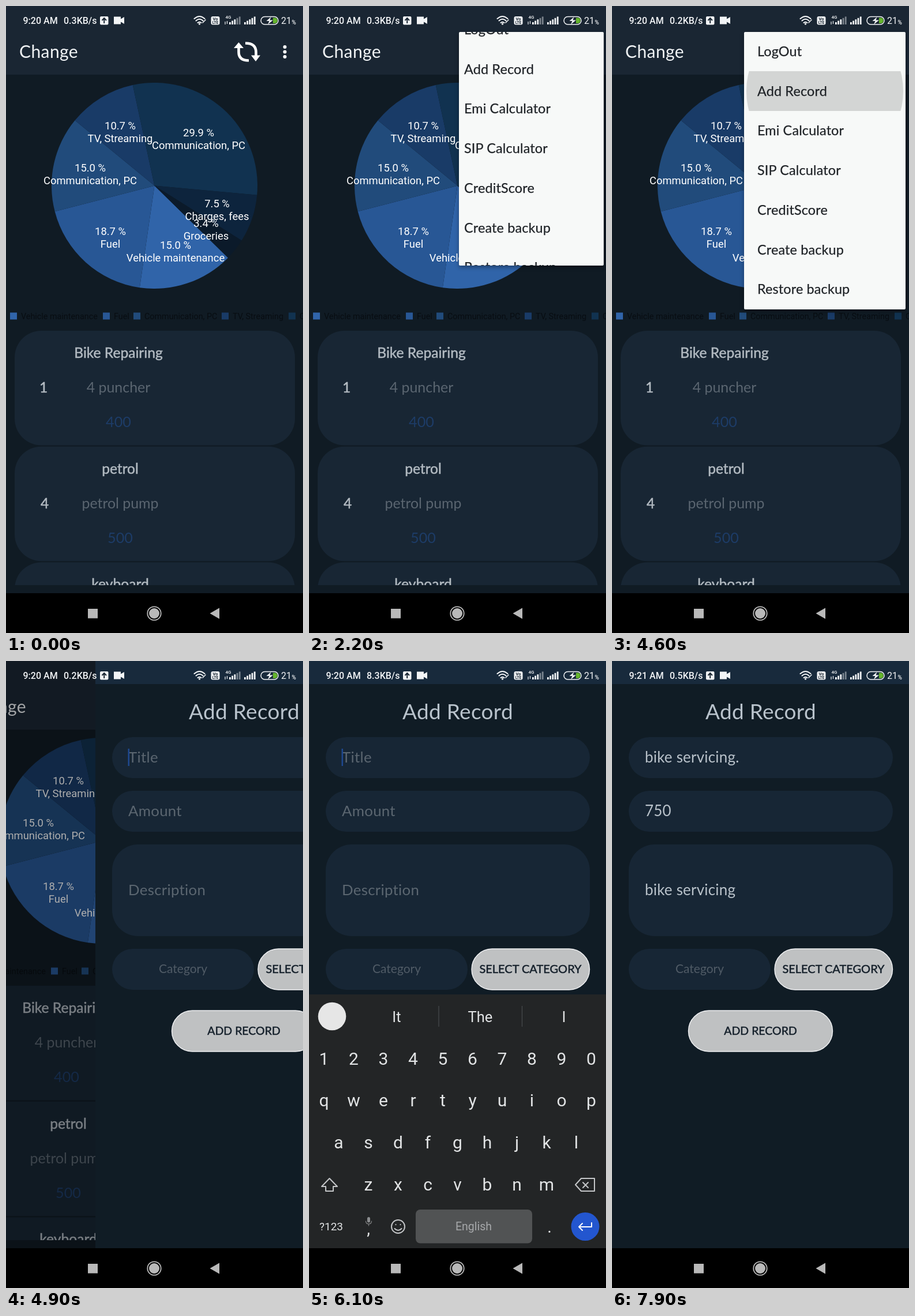
These frames come from a looping animation (515x1087 px, 8000 ms). An HTML page:

```html
<!DOCTYPE html>
<html lang="en">
<head>
<meta charset="utf-8">
<title>Expense tracker</title>
<style>
html, body { margin: 0; width: 100%; height: 100%; overflow: hidden; background: #000; }
body { position: relative; }
svg { display: block; position: absolute; left: 0; top: 0; }
text {
  font-family: Lato, "Open Sans", sans-serif; font-size: 25px; fill: currentColor;
  white-space: pre; font-variant-ligatures: none;
}
.mid { text-anchor: middle; }
.bold { stroke: currentColor; stroke-width: .5px; }
.robo, .robo text { font-family: Roboto, "Noto Sans", sans-serif; }
.hint { color: #5b6670; font-size: 25.8px; letter-spacing: .3px; }
.typed { color: #b9c2ca; font-size: 26px; letter-spacing: .2px; }
.line { fill: none; stroke: currentColor; stroke-width: 2; stroke-linecap: round; stroke-linejoin: round; }
#items text { letter-spacing: .15px; stroke: currentColor; stroke-width: .25px; }

/* One shared 8 s clock; every track holds its value between keys. */
.main, .dim, .page, .blank, .caret, .keys, .touch, .menu, .press, .early, .late, .s1, .s2, .s3 {
  animation: 8s step-end -.03s infinite;
}
.main { animation-name: main; }
.dim { animation-name: dim; }
.page { animation-name: page; }
.blank { animation-name: blank; }
.caret { animation-name: caret; }
.keys { animation-name: keys; }
.touch { animation-name: touch; }
.early { animation-name: early; }
.late { animation-name: late; }
.s1 { animation-name: s1; }
.s2 { animation-name: s2; }
.s3 { animation-name: s3; }
.press { animation-name: press; transform-origin: 369px 147.5px; }
.menu {
  animation-name: menu; position: absolute; top: 45px; overflow: hidden;
  background: #f7f9f8; border-radius: 2px; box-shadow: 0 3px 7px rgba(0, 0, 0, .35);
}
.menu svg { left: 50%; top: 50%; margin: -240.5px 0 0 -140px; }

@keyframes main {
  0% { transform: none; }
  60% { transform: translateX(-34px); }
  61.25% { transform: translateX(-90px); }
  62.5% { transform: translateX(-117px); }
  63.75% { transform: translateX(-127px); }
  65%, 100% { transform: translateX(-129px); }
}
@keyframes dim {
  0% { opacity: 0; }
  60% { opacity: .12; }
  61.25% { opacity: .32; }
  62.5% { opacity: .4; }
  63.75%, 100% { opacity: .45; }
}
@keyframes page {
  0% { transform: translateX(515px); }
  60% { transform: translateX(380px); }
  61.25% { transform: translateX(155px); }
  62.5% { transform: translateX(48px); }
  63.75% { transform: translateX(8px); }
  65%, 100% { transform: none; }
}
@keyframes blank { 0% { opacity: 0; } 62.5% { opacity: 1; } 80%, 100% { opacity: 0; } }
@keyframes caret {
  0%, 66.25%, 78.75%, 91.25%, 100% { opacity: 0; }
  60%, 72.5%, 85% { opacity: 1; }
}
@keyframes keys {
  0% { transform: translateY(509px); }
  62.5% { transform: translateY(150px); }
  63.75% { transform: translateY(10px); }
  65% { transform: none; }
  80% { transform: translateY(170px); }
  81.25% { transform: translateY(448px); }
  82.5%, 100% { transform: translateY(509px); }
}
@keyframes touch { 0% { opacity: 0; } 80% { opacity: .07; } 81.25% { opacity: .05; } 82.5%, 100% { opacity: 0; } }
@keyframes menu {
  0% { left: 350px; width: 160px; height: 250px; opacity: 0; }
  26.25% { left: 350px; width: 160px; height: 250px; opacity: .6; }
  27.5% { left: 260px; width: 251px; height: 405px; opacity: 1; }
  28.75% { left: 232px; width: 277px; height: 476px; opacity: 1; }
  30% { left: 229px; width: 280px; height: 481px; opacity: 1; }
  58.75% { left: 229px; width: 280px; height: 481px; opacity: .6; }
  60%, 100% { left: 229px; width: 280px; height: 481px; opacity: 0; }
}
@keyframes press {
  0% { transform: scale(0); }
  56.25% { transform: scale(.65); }
  57.5% { transform: none; }
  58.75%, 100% { transform: scale(1.2); }
}
@keyframes early { 0% { opacity: 1; } 91.25%, 100% { opacity: 0; } }
@keyframes late { 0% { opacity: 0; } 91.25%, 100% { opacity: 1; } }
@keyframes s1 { 0% { opacity: 1; } 33.75%, 100% { opacity: 0; } }
@keyframes s2 { 0% { opacity: 0; } 33.75% { opacity: 1; } 71.25%, 100% { opacity: 0; } }
@keyframes s3 { 0% { opacity: 0; } 71.25% { opacity: 1; } 91.25%, 100% { opacity: 0; } }
</style>
</head>
<body>
<svg width="515" height="1087" viewBox="0 0 515 1087">
  <defs>
    <clipPath id="list"><rect y="550" width="515" height="454"/></clipPath>
    <clipPath id="row"><rect x="229" y="113.5" width="280" height="68.5"/></clipPath>
  </defs>

  <g class="main">
    <rect width="660" height="1018" fill="#101b24"/>
    <rect width="660" height="119" fill="#1a2633"/>
    <text x="23" y="89.5" style="font-size:30px;letter-spacing:.4px;color:#f0f3f5">Change</text>
    <g fill="#fff">
      <path d="M403.5 71V80Q403.5 94.5 421 94.5M415 64.500Q433.500 64.500 433.500 80V87" fill="none" stroke="#fff" stroke-width="4.6"/>
      <path d="M395 73L403.500 63L412 73ZM425 85.500H441L433 96Z"/>
      <circle cx="483.500" cy="71" r="3"/><circle cx="483.500" cy="79.500" r="3"/><circle cx="483.500" cy="88" r="3"/>
    </g>
    <g id="pie" class="robo" color="#fff"></g>
    <g id="legend" class="robo" color="#080d12"></g>
    <g id="cards" clip-path="url(#list)"></g>
  </g>
  <rect class="dim" width="515" height="1018" fill="#000"/>

  <g class="page">
    <rect width="515" height="1018" fill="#101c25"/>
    <rect width="515" height="40" fill="#182a3c"/>
    <text class="mid" x="258" y="101" style="font-size:37px;letter-spacing:.3px;color:#b9c3cc">Add Record</text>
    <g fill="#172635">
      <rect x="29" y="132" width="458" height="71" rx="35.500"/>
      <rect x="29" y="225" width="458" height="71" rx="35.500"/>
      <rect x="29" y="318" width="458" height="159" rx="45"/>
      <rect x="29" y="499" width="246" height="71" rx="35.500"/>
    </g>
    <g class="early">
      <text class="hint" x="57" y="175.500">Title</text>
      <text class="hint" x="57" y="268.500">Amount</text>
      <text class="hint" x="57" y="405.500">Description</text>
    </g>
    <g class="late">
      <text class="typed" x="57" y="175.500">bike servicing.</text>
      <text class="typed" x="57" y="268.500">750</text>
      <text class="typed" x="57" y="405.500">bike servicing</text>
    </g>
    <rect class="caret" x="56.500" y="152" width="2.500" height="30" fill="#1e4890"/>
    <text class="mid" x="152" y="541" style="font-size:21px;color:#505b66">Category</text>
    <g fill="#bfc1c2" stroke="#f1f2f4" stroke-width="1.400">
      <rect x="282" y="499" width="204.500" height="71" rx="35.500"/>
      <rect x="132.500" y="606" width="250" height="71" rx="35.500"/>
    </g>
    <g color="#15202b">
      <text class="mid bold" x="384" y="541" style="font-size:20px">SELECT CATEGORY</text>
      <text class="mid bold" x="257.500" y="648" style="font-size:19.500px">ADD RECORD</text>
    </g>
    <rect class="blank" y="578" width="515" height="440" fill="#fff"/>
  </g>

  <rect y="1018" width="515" height="69" fill="#000"/>

  <g class="keys robo" color="#e2e4e5">
    <rect y="578" width="515" height="440" fill="#232526"/>
    <circle cx="40" cy="616" r="24.300" fill="#e6e6e6"/>
    <path d="M225 598V634M369.500 598V634" stroke="#484b4d" stroke-width="1.200"/>
    <g id="letters"></g>
    <rect x="185" y="951" width="202" height="58.500" rx="8" fill="#515354"/>
    <text class="mid" x="285.500" y="986.500" style="font-size:19.500px;color:#a6a8aa">English</text>
    <text class="mid" x="38.500" y="987" style="font-size:19px">?123</text>
    <text class="mid" x="103" y="994" style="font-size:29px">,</text>
    <text class="mid" x="417" y="991" style="font-size:29px">.</text>
    <g class="line" color="#c4c6c8">
      <path d="M35.500 897L49 911H42V919H29V911H22Z"/>
      <path d="M472 897H495V919H472L462 908ZM475 904L484 913M484 904L475 913"/>
      <circle cx="154.500" cy="980.500" r="11.500"/>
      <path d="M148.500 984Q154.500 990 160.500 984M150.500 977V977.200M158.500 977V977.200"/>
      <path d="M98.500 971Q98.500 976 103.500 976T108.500 971M103.500 976V979" stroke-width="1.200" opacity=".6"/>
    </g>
    <rect x="101" y="964" width="5" height="9.500" rx="2.500" fill="#8b8d8f"/>
    <circle cx="479" cy="980.500" r="24.500" fill="#2356cf"/>
    <path class="line" d="M490 974V981H468M474 975L468 981L474 987" color="#fff" stroke-width="2.400"/>
  </g>

  <ellipse class="touch" cx="366" cy="1053" rx="54" ry="34" fill="#fff"/>
  <g fill="#b9b9b9">
    <rect x="142" y="1045" width="17" height="16.500"/>
    <circle cx="257" cy="1053" r="9"/>
    <circle cx="257" cy="1053" r="11.700" fill="none" stroke="#b9b9b9" stroke-width="1.800"/>
    <path d="M353.500 1053L370 1043.500V1062.500Z"/>
  </g>

  <g id="status" class="robo" color="#f2f4f6" fill="#f2f4f6">
    <rect x="163" y="18" width="14.500" height="14.500" rx="2"/>
    <path d="M170.200 30V21.500M166.500 25L170.200 21L174 25" fill="none" stroke="#1a2633" stroke-width="2"/>
    <path d="M187 18.500H199V22.500L205 19V31L199 27.500V31.500H187Z"/>
    <g class="line" stroke-width="2.200">
      <path d="M326.500 22Q335.500 14 344.500 22M329.500 25.500Q335.500 20 341.500 25.500M332.500 29Q335.500 26.500 338.500 29"/>
      <path d="M341 29L346 24" stroke-width="1.500"/>
    </g>
    <circle cx="335.500" cy="31" r="1.700"/>
    <rect x="355.500" y="18" width="15" height="14.500" rx="3"/>
    <g style="color:#1a2633">
      <text class="mid" x="363" y="25" style="font-size:7.500px;font-weight:700">Vo</text>
      <text class="mid" x="363" y="31" style="font-size:6.500px;font-weight:700">LTE</text>
    </g>
    <text x="380.500" y="22" style="font-size:8px;font-weight:500">4G</text>
    <path d="M380 27V32M383.500 26V31" stroke="#f2f4f6" stroke-width="1.200"/>
    <g id="bars"></g>
    <rect x="442" y="18.500" width="30" height="13.500" rx="6.700" fill="none" stroke="#f2f4f6" stroke-width="1.500"/>
    <path d="M463 20.500H466Q470.500 20.500 470.500 25.200T466 30H463Z" fill="#65b52c"/>
    <path d="M459.500 19L451.500 26H456.500L454 32L463 24.500H457.500Z"/>
    <text x="477" y="31" style="font-size:16px">21</text>
    <text x="495.500" y="31.500" style="font-size:10px;font-weight:500">%</text>
  </g>
</svg>

<div class="menu">
  <svg width="280" height="481" viewBox="229 45 280 481">
    <g clip-path="url(#row)"><circle class="press" cx="369" cy="147.500" r="136" fill="#d3d5d4"/></g>
    <g id="items" color="#1f2327"></g>
  </svg>
</div>

<script>
const NS = "http://www.w3.org/2000/svg";
const $ = id => document.getElementById(id);

function add(parent, tag, attrs, content) {
  const el = document.createElementNS(NS, tag);
  for (const key in attrs) el.setAttribute(key, attrs[key]);
  if (content) el.textContent = content;
  parent.appendChild(el);
  return el;
}
const label = (parent, content, x, y, size, cls = "", color = "inherit") =>
  add(parent, "text", { x, y, class: cls, style: `font-size:${size}px;color:${color}` }, content);

// name, share, label centre, colour
const slices = [
  ["Vehicle maintenance", 15.0, 294, 414, "#3064a9"],
  ["Fuel", 18.7, 181, 390, "#285795"],
  ["Communication, PC", 15.0, 146, 280, "#214b7b"],
  ["TV, Streaming", 10.7, 198, 207, "#193b67"],
  ["Communication, PC", 29.9, 334, 219.5, "#113250"],
  ["Charges, fees", 7.5, 366, 342, "#0d243d"],
  ["Groceries", 3.4, 347, 376, "#0b1a2a"]
];

function drawPie() {
  const cx = 257.5, cy = 311.5, r = 178.5;
  const total = slices.reduce((sum, s) => sum + s[1], 0);
  const rim = a => `${cx + r * Math.cos(a)} ${cy + r * Math.sin(a)}`;
  let angle = 44.4 * Math.PI / 180;
  for (const [, share, , , fill] of slices) {
    const end = angle + share / total * 2 * Math.PI;
    add($("pie"), "path", { d: `M${cx} ${cy}L${rim(angle)}A${r} ${r} 0 0 1 ${rim(end)}Z`, fill });
    angle = end;
  }
  for (const [name, share, x, y] of slices) {
    label($("pie"), share.toFixed(1) + " %", x, y + 6.5, 18.4, "mid");
    label($("pie"), name, x, y + 28.5, 18.4, "mid");
  }
}

function drawLegend() {
  [7, 168, 221, 374, 490].forEach((x, i) => {
    add($("legend"), "rect", { x, y: 531.5, width: 12, height: 12, fill: slices[i][4] });
    label($("legend"), slices[i][0], x + 19, 542.5, 14.35);
  });
}

function drawCards() {
  const rows = [
    ["1", 65, "Bike Repairing", "4 puncher", "400", 195],
    ["4", 67, "petrol", "petrol pump", "500", 198],
    ["5", 67, "keyboard", "new", "600", 198]
  ];
  rows.forEach(([count, cx, title, note, sum, x], i) => {
    const y = 563 + i * 200.7, g = $("cards");
    add(g, "rect", { x: 15, y, width: 486, height: 198.5, rx: 46, fill: "#182634" });
    label(g, count, cx, y + 107, 24.5, "mid bold", "#b2bac1");
    label(g, title, x, y + 47, 24.6, "mid bold", "#b2bac1");
    label(g, note, x, y + 107, 24.9, "mid", "#5a6570");
    label(g, sum, x, y + 167, 25.2, "mid", "#1d3c67");
  });
}

function drawKeys() {
  const rows = [["1234567890", 26, 700], ["qwertyuiop", 26, 772], ["asdfghjkl", 51.5, 845], ["zxcvbnm", 103, 918]];
  for (const [chars, x, y] of rows)
    [...chars].forEach((c, i) => label($("letters"), c, x + i * 51.5, y, 30, "mid"));
  ["It", "The", "I"].forEach((word, i) => label($("letters"), word, 152 + i * 145, 626, 25.5, "mid"));
}

function drawStatus() {
  const s = $("status");
  const put = (content, x, cls) => label(s, content, x, 31, 16, cls).style.fontWeight = 500;
  put("9:20 AM", 29.5, "early");
  put("9:21 AM", 29.5, "late");
  ["0.3", "0.2", "8.3", "0.5"].forEach((v, i) => put(v + "KB/s", 100, ["s1", "s2", "s3", "late"][i]));
  for (const x of [387, 413])
    for (let i = 0; i < 5; i++) {
      const height = 4 + i * 2.4;
      add($("bars"), "rect", { x: x + i * 4.2, y: 32 - height, width: 2.8, height, opacity: x < 400 && i > 2 ? .45 : 1 });
    }
}

const items = ["LogOut", "Add Record", "Emi Calculator", "SIP Calculator", "CreditScore", "Create backup", "Restore backup"];
items.forEach((name, i) => label($("items"), name, 252, 87 + i * 68.7, 23.4));

drawPie();
drawLegend();
drawCards();
drawKeys();
drawStatus();
</script>
</body>
</html>
```
